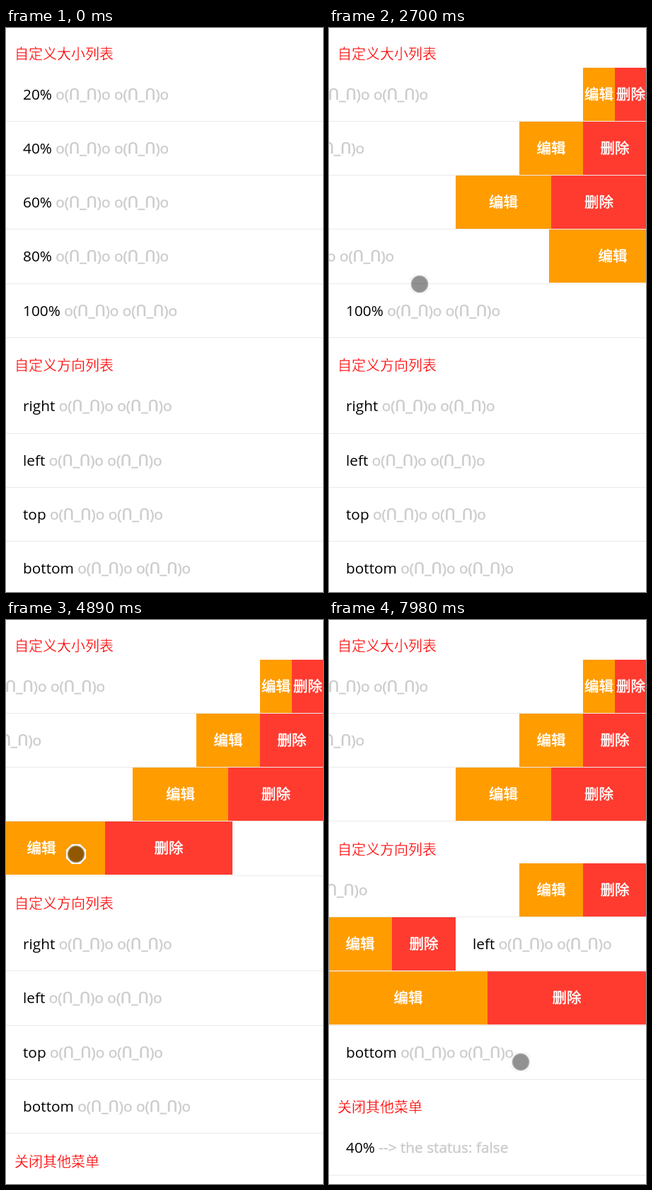
Write an HTML page that moves like this. It is 448 px wide and 795 px high and loops after 8 s.

```html
<!DOCTYPE html>
<html lang="zh-CN">
<head>
<meta charset="utf-8">
<title>滑动菜单</title>
<style>
html, body { margin: 0; width: 100%; height: 100%; overflow: hidden; background: #fff; }
body { position: relative; font: 20.8px 'Open Sans', 'Noto Sans', 'DejaVu Sans', 'Noto Sans CJK SC', 'Noto Sans CJK', sans-serif; color: #000; }
main { position: absolute; top: -2.85px; left: 0; width: 449px; }
h2 { margin: 0; height: 58.5px; padding: 19.35px 0 0 12px; box-sizing: border-box; font-size: 20px; line-height: 40px; font-weight: 300; color: #f00; white-space: nowrap; -webkit-text-stroke: .3px #fff; }
.row { height: 76.25px; box-sizing: border-box; border-bottom: 1px solid #eaeaea; overflow: hidden; position: relative; }
.slide { position: relative; height: 75.25px; padding-left: 24px; line-height: 75.25px; white-space: pre; }
.slide > span { color: #ccc; -webkit-text-stroke: .5px #ccc; }
.menu { position: absolute; top: 0; left: 100%; width: var(--size, 180px); height: 75px; display: flex; color: #fff; font-size: 20.5px; -webkit-text-stroke: .5px #fff; }
.menu.left { left: auto; right: 100%; }
.menu.top { left: 0; top: -100%; width: 448px; }
.menu b { flex: 1 0 0; min-width: 0; display: flex; justify-content: center; font-weight: 400; background: #ff9c00; }
.menu b + b { background: #ff3b30; }

.slide { animation: 8s linear infinite both; }
.s20 { --size: 90px; animation-name: open20; }
.s40 { animation-name: open40; }
.s60 { --size: 270px; animation-name: open60; }
.s80 { --size: 360px; animation-name: open80; }
.s100 { --size: 450px; animation-name: open100; }
.to-right { animation-name: openRight; }
.to-left { animation-name: openLeft; }
.to-top { animation-name: openTop; }
.gone80 { animation: remove80 8s step-end infinite; }
.gone100 { animation: remove100 8s step-end infinite; }

@keyframes open20 {
  0%, 7.8% { transform: none; }
  10.5% { transform: translateX(-72px); animation-timing-function: ease-out; }
  12.7%, 100% { transform: translateX(-90px); }
}
@keyframes open40 {
  0%, 18.1% { transform: none; }
  20.1%, 20.5% { transform: translateX(-82px); }
  21.3% { transform: translateX(-140px); animation-timing-function: ease-out; }
  23.9%, 100% { transform: translateX(-180px); }
}
@keyframes open60 {
  0%, 26.5% { transform: none; }
  28.75% { transform: translateX(-150px); animation-timing-function: ease-out; }
  31%, 100% { transform: translateX(-270px); }
}
@keyframes open80 {
  0%, 32.6% { transform: none; }
  33.7%, 34.2% { transform: translateX(-138px); }
  35% { transform: translateX(-215px); animation-timing-function: ease-out; }
  37.7%, 59.2% { transform: translateX(-360px); }
  61.1%, 61.5% { transform: translateX(-489px); }
  63%, 100% { transform: translateX(-810px); }
}
@keyframes open100 {
  0%, 40.7% { transform: none; }
  41.8% { transform: translateX(-200px); animation-timing-function: ease-out; }
  43.6%, 44% { transform: translateX(-431px); }
  44.7%, 51.6% { transform: translateX(-450px); }
  53.6% { transform: translateX(-600px); }
  56.2%, 100% { transform: translateX(-900px); }
}
@keyframes openRight {
  0%, 76.3% { transform: none; }
  78.6% { transform: translateX(-110px); animation-timing-function: ease-out; }
  81.5%, 100% { transform: translateX(-180px); }
}
@keyframes openLeft {
  0%, 83.3% { transform: none; }
  85.7% { transform: translateX(130px); animation-timing-function: ease-out; }
  88.5%, 100% { transform: translateX(179px); }
}
@keyframes openTop {
  0%, 93.4% { transform: none; }
  96% { transform: translateY(45px); animation-timing-function: ease-out; }
  99.1%, 100% { transform: translateY(75.25px); }
}
@keyframes remove100 { 0% { height: 76.25px; border-width: 1px; } 56.25%, 100% { height: 0; border-width: 0; } }
@keyframes remove80 { 0% { height: 76.25px; border-width: 1px; } 63%, 100% { height: 0; border-width: 0; } }

#touch { position: absolute; left: 0; top: 0; width: 1px; height: 1px; overflow: visible; animation: travel 8s linear infinite, appear 8s step-end infinite; }
@keyframes appear { 0% { opacity: 0; } .875%, 100% { opacity: 1; } }
@keyframes travel {
  0%, .9% { transform: translate(362px, 591px); }
  1.8%, 3.75% { transform: translate(356px, 469px); }
  7.5% { transform: translate(310px, 95px); }
  10.5%, 14.2% { transform: translate(235px, 98px); }
  18% { transform: translate(299px, 180px); }
  20.1%, 20.5% { transform: translate(217px, 189px); }
  21.3% { transform: translate(159px, 192px); }
  24.1%, 24.8% { transform: translate(285px, 238px); }
  26.5% { transform: translate(290px, 250px); }
  28.75% { transform: translate(140px, 262px); }
  31%, 32.6% { transform: translate(265px, 323px); }
  33.7%, 34.2% { transform: translate(128px, 361px); }
  35% { transform: translate(90px, 368px); }
  37.7%, 40.6% { transform: translate(320px, 412px); }
  41.8% { transform: translate(140px, 424px); }
  43.6%, 44% { transform: translate(340px, 439px); }
  50.4%, 51.5% { transform: translate(325px, 405px); }
  53.6% { transform: translate(150px, 408px); }
  58.8% { transform: translate(227px, 326px); }
  61.1%, 61.5% { transform: translate(99px, 330px); }
  63%, 67% { transform: translate(107px, 335px); }
  68.75%, 71.6% { transform: translate(127px, 354px); }
  75.6%, 76.1% { transform: translate(345px, 376px); }
  78.6% { transform: translate(235px, 384px); }
  81.5%, 82.5% { transform: translate(130px, 430px); }
  83.3% { transform: translate(145px, 440px); }
  85.7% { transform: translate(275px, 454px); }
  88.3% { transform: translate(360px, 480px); }
  91.1%, 93% { transform: translate(265px, 520px); }
  96% { transform: translate(268px, 570px); }
  99.4%, 100% { transform: translate(271px, 623px); }
}
</style>
</head>
<body>
<main>
  <h2>自定义大小列表</h2>
  <div class="row"><div class="slide s20">20% <span>o(Ո_Ո)o o(Ո_Ո)o</span><div class="menu"><b>编辑</b><b>删除</b></div></div></div>
  <div class="row"><div class="slide s40">40% <span>o(Ո_Ո)o o(Ո_Ո)o</span><div class="menu"><b>编辑</b><b>删除</b></div></div></div>
  <div class="row"><div class="slide s60">60% <span>o(Ո_Ո)o o(Ո_Ո)o</span><div class="menu"><b>编辑</b><b>删除</b></div></div></div>
  <div class="row gone80"><div class="slide s80">80% <span>o(Ո_Ո)o o(Ո_Ո)o</span><div class="menu"><b>编辑</b><b>删除</b></div></div></div>
  <div class="row gone100"><div class="slide s100">100% <span>o(Ո_Ո)o o(Ո_Ո)o</span><div class="menu"><b>编辑</b><b>删除</b></div></div></div>
  <h2>自定义方向列表</h2>
  <div class="row"><div class="slide to-right">right <span>o(Ո_Ո)o o(Ո_Ո)o</span><div class="menu"><b>编辑</b><b>删除</b></div></div></div>
  <div class="row"><div class="slide to-left">left <span>o(Ո_Ո)o o(Ո_Ո)o</span><div class="menu left"><b>编辑</b><b>删除</b></div></div></div>
  <div class="row"><div class="slide to-top">top <span>o(Ո_Ո)o o(Ո_Ո)o</span><div class="menu top"><b>编辑</b><b>删除</b></div></div></div>
  <div class="row"><div class="slide">bottom <span>o(Ո_Ո)o o(Ո_Ո)o</span></div></div>
  <h2>关闭其他菜单</h2>
  <div class="row"><div class="slide">40% <span>--&gt; the status: false</span></div></div>
</main>
<svg id="touch" aria-hidden="true">
  <path fill="#fff" fill-rule="evenodd" d="M-6-14H6L14-6V6L6 14H-6L-14 6V-6ZM-12 0A12 12 0 0 0 12 0A12 12 0 0 0-12 0Z"/>
  <path fill="none" stroke="#ccc" stroke-width=".7" stroke-dasharray="2 1" d="M6-14L14-6M14 6L6 14M-6 14L-14 6M-14-6L-6-14"/>
  <circle r="11.5" fill="#000" fill-opacity=".43"/>
  <circle r="11.7" fill="none" stroke="#aaa" stroke-opacity=".8" stroke-width="1.6"/>
</svg>
</body>
</html>
```
